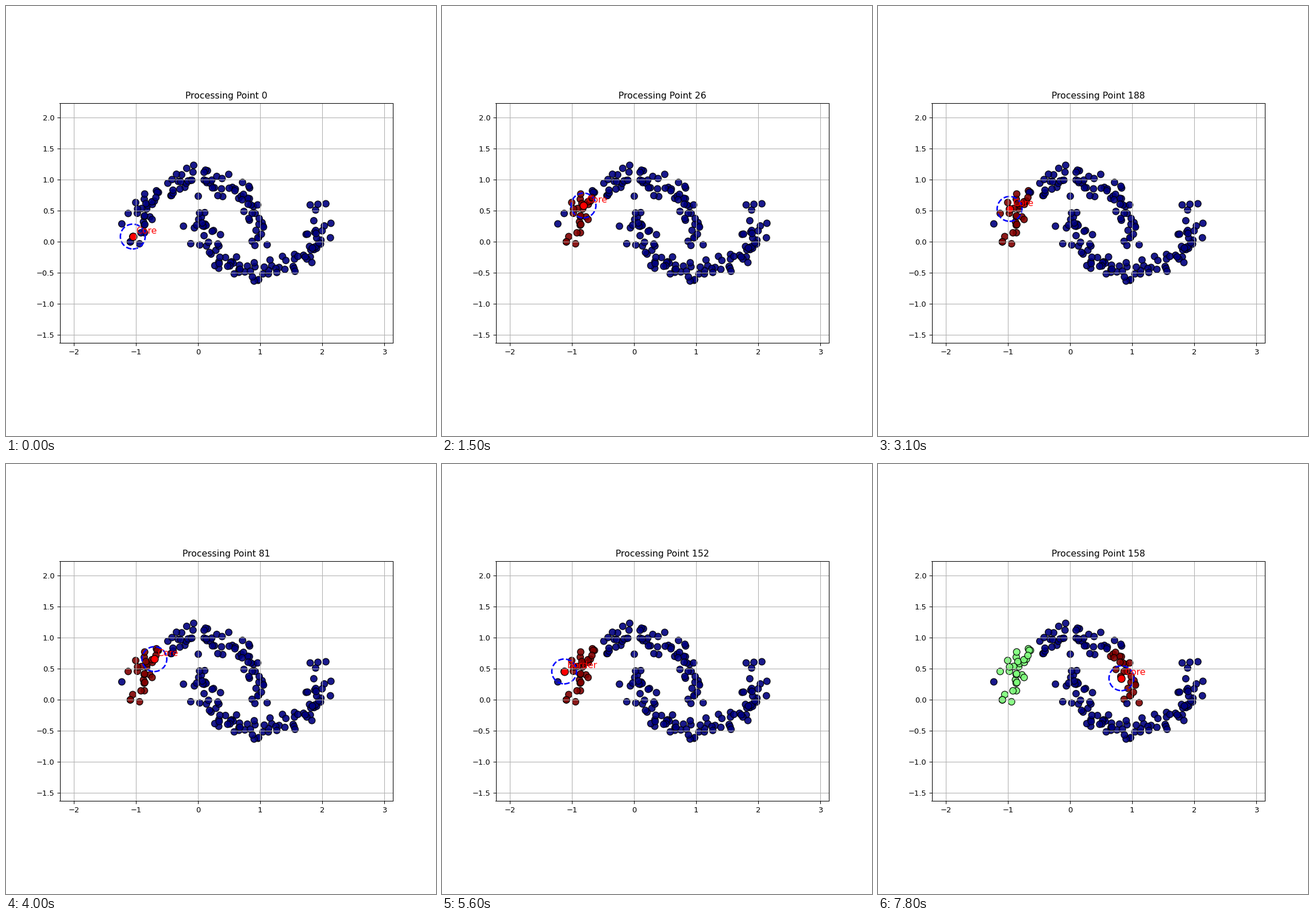
Animation, 748 px wide and 748 px high, one loop 8 s. Source, as a matplotlib script:

```python
from itertools import islice

import matplotlib.pyplot as plt
import numpy as np
from matplotlib.animation import FuncAnimation

COUNT, NOISE, SEED = 200, 0.1, 42
EPS, MIN_PTS = 0.2, 5
FRAMES, INTERVAL = 80, 100


def make_moons():
    """Two shuffled, noisy half circles."""
    rng = np.random.RandomState(SEED)
    arc = np.linspace(0, np.pi, COUNT // 2)
    upper = np.column_stack([np.cos(arc), np.sin(arc)])
    lower = np.column_stack([1 - np.cos(arc), 0.5 - np.sin(arc)])
    order = np.arange(COUNT)
    rng.shuffle(order)
    points = np.vstack([upper, lower])[order]
    return points + rng.normal(scale=NOISE, size=points.shape)


def dbscan(points):
    """Yield (labels, index, is_core) before and after each expansion."""
    labels = np.zeros(len(points), int)
    visited = np.zeros(len(points), bool)
    cluster = 0

    def neighbours(i):
        dist = np.linalg.norm(points - points[i], axis=1)
        return np.flatnonzero(dist <= EPS).tolist()

    for start in range(len(points)):
        if visited[start]:
            continue
        cluster += 1
        seeds = {start}
        while seeds:
            i = seeds.pop()
            if visited[i]:
                continue
            visited[i] = True
            near = neighbours(i)
            core = len(near) >= MIN_PTS
            yield labels.copy(), i, core
            if core:
                labels[near] = cluster
                if i == start:
                    seeds = set(near)
                else:
                    seeds.update(near)
            yield labels.copy(), i, core


points = make_moons()
steps = list(islice(dbscan(points), FRAMES))

fig, ax = plt.subplots(figsize=(8, 8), dpi=93.5)
(x0, y0), (x1, y1) = points.min(axis=0) - 1, points.max(axis=0) + 1
ax.set(xlim=(x0, x1), ylim=(y0, y1), aspect="equal")
ax.grid(True)

dots = ax.scatter(*points.T, c=np.zeros(COUNT), cmap="jet", s=80,
                  edgecolor="k", alpha=0.9)
current = ax.scatter([0], [0], color="red", s=100, edgecolor="k")
ring = plt.Circle((0, 0), EPS, color="blue", fill=False,
                  linestyle="--", linewidth=2)
ax.add_patch(ring)
tag = ax.text(0, 0, "", color="red", fontsize=12)
title = ax.set_title("")


def update(frame):
    labels, i, core = steps[frame]
    x, y = points[i]
    dots.set_array(labels)
    dots.set_clim(labels.min(), labels.max())
    current.set_offsets([(x, y)])
    ring.set_center((x, y))
    tag.set_position((x + 0.05, y + 0.05))
    tag.set_text("Core" if core else "Border")
    title.set_text(f"Processing Point {i}")
    return dots, current, ring, tag, title


anim = FuncAnimation(fig, update, frames=FRAMES, interval=INTERVAL,
                     repeat=True, repeat_delay=0)

plt.show()
```
